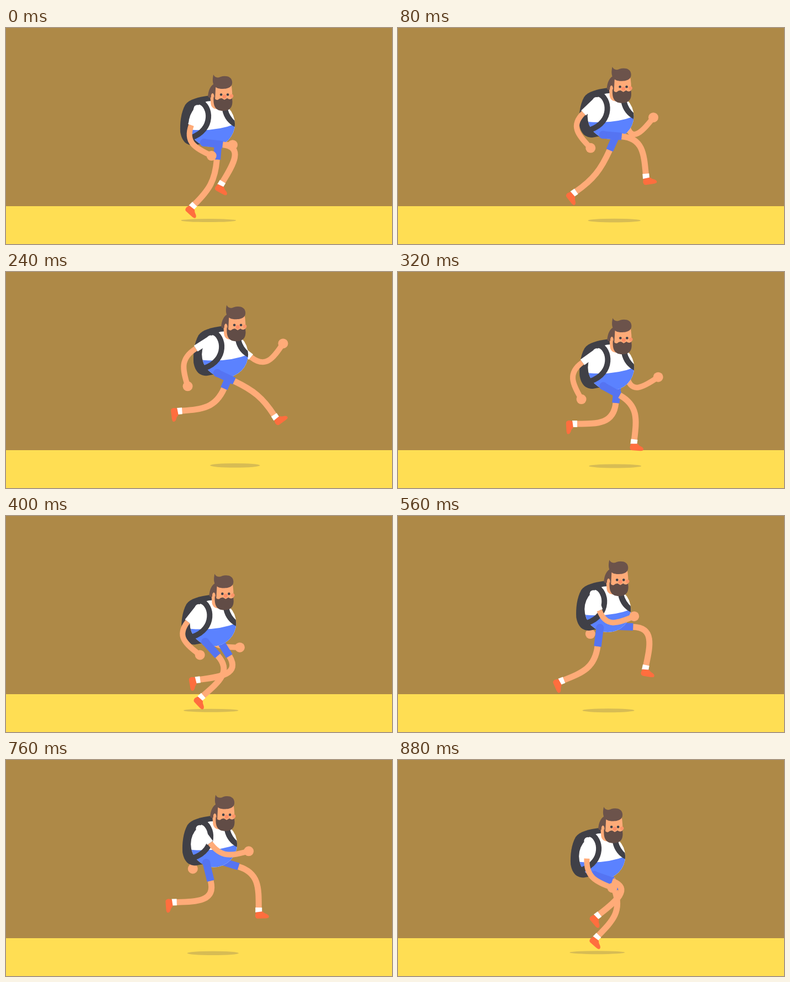
These frames come from a looping animation (700 by 394 pixels, 0.92 s). An HTML page with a canvas:

```html
<!DOCTYPE html>
<html lang="en">
<head>
<meta charset="utf-8">
<title>Runner</title>
<style>
html, body { margin: 0; height: 100%; overflow: hidden; background: #ae8947; }
canvas { display: block; }
</style>
</head>
<body>
<canvas id="stage" width="700" height="394"></canvas>
<script>
const ctx = document.getElementById('stage').getContext('2d');
const LOOP = 920, STEP = 40, GROUND = 325, LOWEST_ANKLE = 328;
const SKIN = '#ffab78', DARK = '#404047', HAIR = '#6c534b', BEARD = '#614c46',
      BLUE = '#5b82ff', SHORTS = '#5574f2', SHOE = '#ff6e3e', WHITE = '#fff';

const phase = (t, peak, period = LOOP) => 2 * Math.PI * (t - peak) / period;
const wave = (t, peak, period) => Math.cos(phase(t, peak, period));
const polar = ([x, y], angle, r) => [x + r * Math.cos(angle), y + r * Math.sin(angle)];
const direction = ([x, y], [x2, y2]) => Math.atan2(y2 - y, x2 - x);

function fill(d, color) {
  ctx.fillStyle = color;
  ctx.fill(new Path2D(d));
}

function stroke(d, color, width) {
  ctx.strokeStyle = color;
  ctx.lineWidth = width;
  ctx.stroke(new Path2D(d));
}

function oval(x, y, rx, ry, color) {
  ctx.fillStyle = color;
  ctx.beginPath();
  ctx.ellipse(x, y, rx, ry, 0, 0, 2 * Math.PI);
  ctx.fill();
}

const dot = (x, y, r, color) => oval(x, y, r, r, color);

// Two-bone limb drawn as one soft curve; returns the direction at its end.
function limb(joint, end, { upper, lower, bend, cuff, width, clothWidth, cloth }) {
  const reach = Math.min(Math.hypot(end[0] - joint[0], end[1] - joint[1]),
                         upper + lower - 2);
  const opening = Math.acos((upper ** 2 + reach ** 2 - lower ** 2) / (2 * upper * reach));
  const top = direction(joint, end) + bend * opening;
  const tip = direction(polar(joint, top, upper), end) - bend * 0.2;
  const hem = polar(joint, top, cuff);
  const handle = 0.3 * (upper + lower);
  stroke(`M${hem} C${polar(hem, top, handle)} ${polar(end, tip, -handle)} ${end}`,
         SKIN, width);
  stroke(`M${joint} L${hem}`, cloth, clothWidth);
  dot(...joint, clothWidth / 2 + 0.5, cloth);
  return tip;
}

const LEG = { upper: 58, lower: 70, bend: -1, cuff: 34,
              width: 11, clothWidth: 13.5, cloth: SHORTS };
const ARM = { upper: 56, lower: 56, bend: 1, cuff: 32,
              width: 10, clothWidth: 12.5, cloth: WHITE };

// The foot travels back fast in contact and is carried forward slowly.
function leg(t, [x, y], peak, middle) {
  const p = phase(t, peak), push = Math.max(0, Math.sin(p));
  const ankle = [x + middle + 91 * Math.cos(p + 0.5 * push),
                 Math.min(y + 72 + 44 * push ** 1.5, LOWEST_ANKLE)];
  const tip = limb([x, y], ankle, LEG);
  ctx.save();
  ctx.translate(...ankle);
  ctx.rotate(tip - Math.PI / 2);
  fill('M-6,-1 H6 V8 H-6Z', WHITE);
  ctx.rotate(-0.12);
  fill('M-6,7 H6 Q9,11 14,13 Q18,16 16,19 Q15,20 11,20 L-3,19 Q-8,19 -8,13Z', SHOE);
  ctx.restore();
}

// The hand swings along an arc and lifts as it comes forward.
function arm(t, [x, y], peak, middle, swing, rest) {
  const lift = Math.max(0, wave(t, peak - 25)) ** 2;
  const hand = [x + middle + swing * wave(t, peak), y + rest - 75 * lift];
  limb([x, y], hand, ARM);
  dot(...hand, 9, SKIN);
}

function bag() {
  fill('M370,123 C348,126 332,130 325,140 C317,154 315,174 316,190 ' +
       'C319,207 327,214 340,214 L356,211 L375,150Z', DARK);
}

function torso() {
  ctx.save();
  ctx.beginPath();
  ctx.arc(373, 175, 42, 0, 2 * Math.PI);
  ctx.clip();
  fill('M320,120 H430 V230 H320Z', WHITE);
  fill('M328,185 Q380,190 418,174 V225 H328Z', BLUE);
  fill('M392,150 L402,148 Q406,163 418,172 V182 Q397,173 392,150Z', DARK);
  ctx.restore();
  stroke('M352,135 C371,141 378,185 336,200', DARK, 10);
}

function head() {
  fill('M370,122 H381 L384,148 Q371,148 371,135Z', SKIN);
  fill('M378,101 H408 Q411,115 410,134 H378Z', SKIN);
  dot(409, 124, 3.2, '#ff9469');
  fill('M381,100 C370,104 367,114 366,125 Q369,129 372,126 ' +
       'Q372,119 375,119 L376,129 L379,129 L380,110Z', HAIR);
  oval(374.5, 125, 2.8, 6, SKIN);
  fill('M376.5,125 Q379,132 384,131 Q387,128 391,128 L396,131 L401,128 ' +
       'Q406,132 410,128 C412,144 407,151 393,151 C380,151 375,143 376.5,125Z', BEARD);
  dot(396, 125, 3.5, '#ff8d67');
  dot(390, 121.5, 2.3, DARK);
  dot(402, 121.5, 2.3, DARK);
  fill('M376,85 C378,90 384,92 389,89 C398,86 409,88 410,98 ' +
       'C411,108 402,111 392,111 C378,111 372,103 376,85Z', HAIR);
}

function draw(now) {
  const t = Math.floor(now % LOOP / STEP) * STEP;
  const hop = wave(t, 435, LOOP / 2);
  const dx = 9 + 10 * wave(t, 195, LOOP / 2) + 7 * wave(t, 230);
  const dy = -9 + 21 * hop + 11 * wave(t, 430);
  const at = (x, y) => [x + dx, y + dy];
  const onBody = (...parts) => {
    ctx.save();
    ctx.translate(dx, dy);
    parts.forEach(part => part());
    ctx.restore();
  };

  fill('M0,0 H700 V394 H0Z', '#ae8947');
  fill(`M0,${GROUND} H700 V394 H0Z`, '#ffde53');
  oval(367 + 2 * dx, 353 + 2 * wave(t, 480), 47.5 + 2.5 * hop, 3.5 - 0.5 * hop, '#d7bc54');
  arm(t, at(395, 160), 210, 5, 80, 60);
  leg(t, at(385, 206), 690, 0);
  onBody(bag, torso);
  leg(t, at(359, 209), 205, 18);
  onBody(head);
  arm(t, at(347, 147), 685, 28, 70, 86);
}

const start = performance.now();
function frame() {
  draw(performance.now() - start);
  requestAnimationFrame(frame);
}
frame();
</script>
</body>
</html>
```
